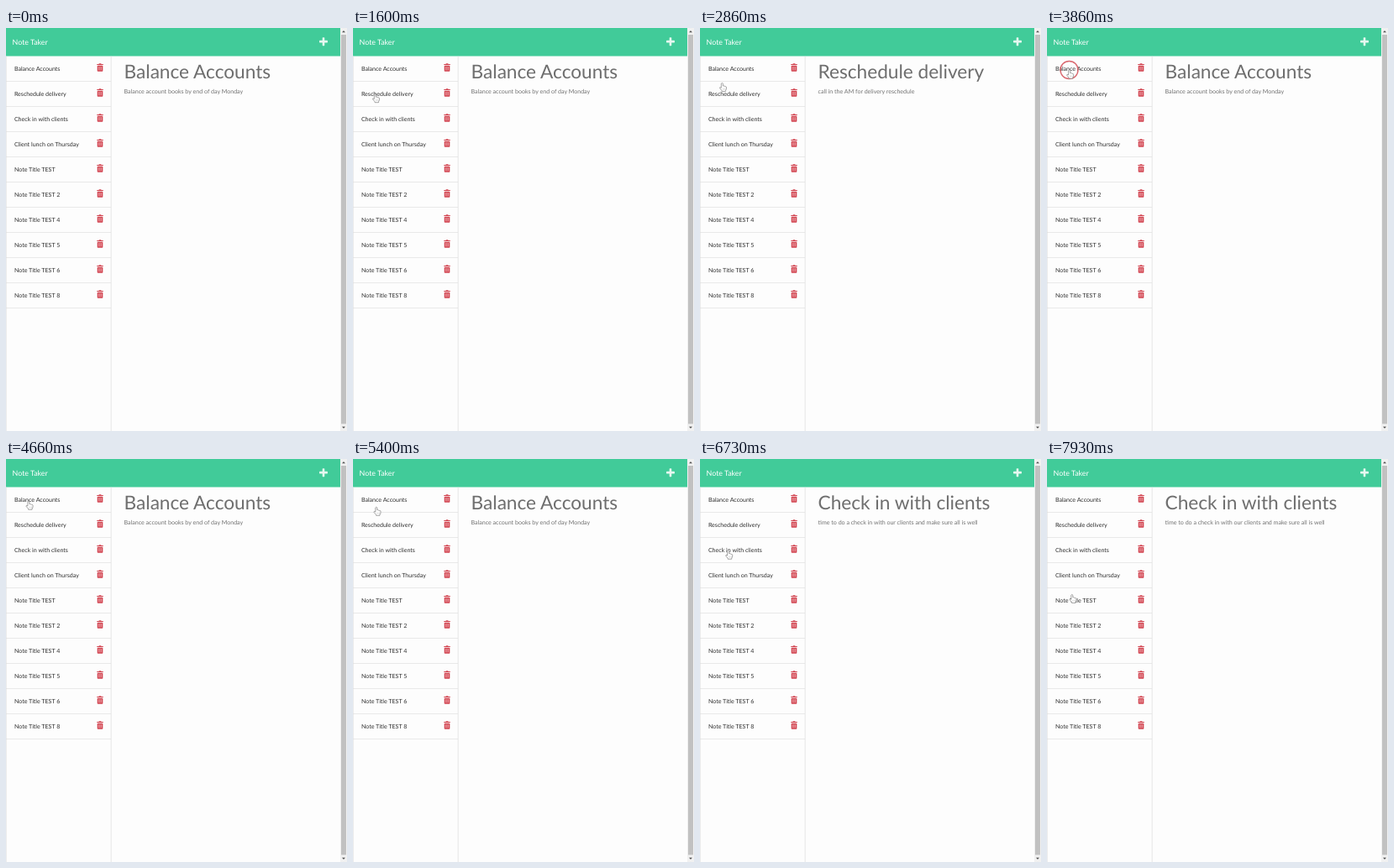
Animation of 406 by 480 pixels, one loop 8000 ms. Source, as an HTML page with a canvas:

```html
<!DOCTYPE html>
<html lang="en">
<head>
<meta charset="utf-8">
<title>Note Taker</title>
<style>
html, body { margin: 0; width: 100%; height: 100%; overflow: hidden; background: #fdfdfd; }
canvas { display: block; width: 406px; height: 480px; }
</style>
</head>
<body>
<canvas id="stage"></canvas>
<script>
const W = 406, H = 480, LOOP = 8000, ROW = 30, HEAD = 33.5;
const ZOOM = 0.4713; // page pixels to stage pixels
const canvas = document.getElementById('stage');
const ctx = canvas.getContext('2d');
const dpr = window.devicePixelRatio || 1;
canvas.width = W * dpr;
canvas.height = H * dpr;

const items = ['Balance Accounts', 'Reschedule delivery', 'Check in with clients',
  'Client lunch on Thursday', 'Note Title TEST', 'Note Title TEST 2',
  'Note Title TEST 4', 'Note Title TEST 5', 'Note Title TEST 6', 'Note Title TEST 8'];
const bodies = ['Balance account books by end of day Monday',
  'call in the AM for delivery reschedule',
  'time to do a check in with our clients and make sure all is well'];

// start time and index of the note on show
const shown = [[0, 0], [1960, 1], [3720, 0], [6300, 2]];
const clicks = [1900, 3660, 6240];
const RING = 420;

// pointer hotspot: time, x, y
const path = [
  [1060, 40, 102], [1500, 26.3, 78.5], [2480, 26.3, 78.5], [3280, 26.3, 50],
  [5200, 27, 50], [6130, 33.5, 109], [7300, 33.5, 109], [8100, 29.3, 168]
];

function rect(x, y, w, h, color) {
  ctx.fillStyle = color;
  ctx.fillRect(x, y, w, h);
}

function round(x, y, w, h, r) {
  ctx.beginPath();
  ctx.roundRect(x, y, w, h, r);
  ctx.fill();
}

// size is in page pixels; zooming keeps fractional letter advances
function text(str, x, y, size, color) {
  ctx.save();
  ctx.translate(x, y);
  ctx.scale(ZOOM, ZOOM);
  ctx.textRendering = 'geometricPrecision';
  ctx.font = `${size}px Lato, sans-serif`;
  ctx.fillStyle = color;
  ctx.fillText(str, 0, 0);
  ctx.restore();
}

function triangle(x, y, dir) {
  ctx.fillStyle = '#555';
  ctx.beginPath();
  ctx.moveTo(x - 2, y + dir);
  ctx.lineTo(x + 2, y + dir);
  ctx.lineTo(x, y - dir);
  ctx.fill();
}

function trash(x, y) {
  ctx.fillStyle = '#d24450';
  round(x - 1.5, y - 4.9, 3, 1.5, 0.5);
  round(x - 3.8, y - 4.2, 7.6, 1.2, 0.3);
  round(x - 3.3, y - 2.4, 6.6, 7, 0.8);
  for (const dx of [-1.7, 0, 1.7]) rect(x + dx - 0.3, y - 1.1, 0.6, 4.3, '#f3c6ca');
}

function pointerAt(t) {
  if (t < path[0][0]) return null;
  const i = path.findIndex(p => p[0] > t);
  const [t0, x0, y0] = path[i - 1], [t1, x1, y1] = path[i];
  const u = (t - t0) / (t1 - t0), e = u * u * (3 - 2 * u);
  return [x0 + (x1 - x0) * e, y0 + (y1 - y0) * e];
}

function hand(x, y) {
  ctx.save();
  ctx.translate(x, y);
  ctx.beginPath();
  ctx.moveTo(-1, 6);
  ctx.lineTo(-1, 0.9);
  ctx.quadraticCurveTo(0, -0.7, 1, 0.9);
  ctx.lineTo(1, 3.7);
  ctx.quadraticCurveTo(2, 3, 2.6, 4.1);
  ctx.quadraticCurveTo(3.6, 3.5, 4, 4.6);
  ctx.quadraticCurveTo(5, 4.2, 5.2, 5.4);
  ctx.lineTo(5.1, 7.4);
  ctx.lineTo(4.2, 9.2);
  ctx.lineTo(4.2, 10.2);
  ctx.lineTo(-0.3, 10.2);
  ctx.lineTo(-0.4, 9.2);
  ctx.lineTo(-2.9, 6.2);
  ctx.quadraticCurveTo(-3, 4.5, -1, 6);
  ctx.closePath();
  ctx.fillStyle = '#fff';
  ctx.fill();
  ctx.strokeStyle = '#747474';
  ctx.lineWidth = 0.65;
  ctx.lineJoin = 'round';
  ctx.stroke();
  ctx.beginPath();
  for (const dx of [0.9, 2.3, 3.7]) {
    ctx.moveTo(dx, 6.6);
    ctx.lineTo(dx, 8.4);
  }
  ctx.lineWidth = 0.25;
  ctx.stroke();
  ctx.restore();
}

function ring(x, y, age) {
  const u = age / RING;
  ctx.globalAlpha = Math.min(1, (1 - u) * 1.7);
  ctx.beginPath();
  ctx.arc(x, y, 5 + 11.5 * u, 0, Math.PI * 2);
  ctx.strokeStyle = '#d4555d';
  ctx.lineWidth = 1.4;
  ctx.stroke();
  ctx.globalAlpha = 1;
}

function page(note) {
  rect(0, 0, W, H, '#fdfdfd');
  rect(0, 0, 398, HEAD, '#41cb99');
  text('Note Taker', 7.6, 19.5, 18.75, '#fff');
  ctx.fillStyle = '#e6f8f0';
  round(373, 14.8, 10, 2.6, 0.6);
  round(376.7, 11.2, 2.6, 10, 0.6);

  rect(0, HEAD, 0.5, H, '#dcdcdc');
  rect(124.8, HEAD, 0.6, H, '#d8d8d8');
  items.forEach((name, i) => {
    const y = HEAD + ROW * i;
    rect(0, y + ROW - 0.5, 125, 0.6, '#dcdcdc');
    text(name, 9.9, y + 17.3, 15, '#2e2e2e');
    trash(112, y + 13.6);
  });

  text(items[note], 140.6, 60, 48, '#6e6e6e');
  text(bodies[note], 140.6, 78.4, 15, '#717171');

  rect(398, 0, 8, H, '#f1f1f1');
  rect(399, 8, 6, 463.5, '#c1c1c1');
  triangle(402, 4.2, 1.1);
  triangle(402, 475.8, -1.1);
}

function draw(t) {
  ctx.setTransform(dpr, 0, 0, dpr, 0, 0);
  page(shown.filter(s => s[0] <= t).pop()[1]);
  const p = pointerAt(t);
  if (!p) return;
  const hit = clicks.find(c => t >= c && t < c + RING);
  if (hit !== undefined) ring(...p, t - hit);
  hand(...p);
}

const start = performance.now();
function tick() {
  draw((performance.now() - start) % LOOP);
  requestAnimationFrame(tick);
}
tick();
</script>
</body>
</html>
```
